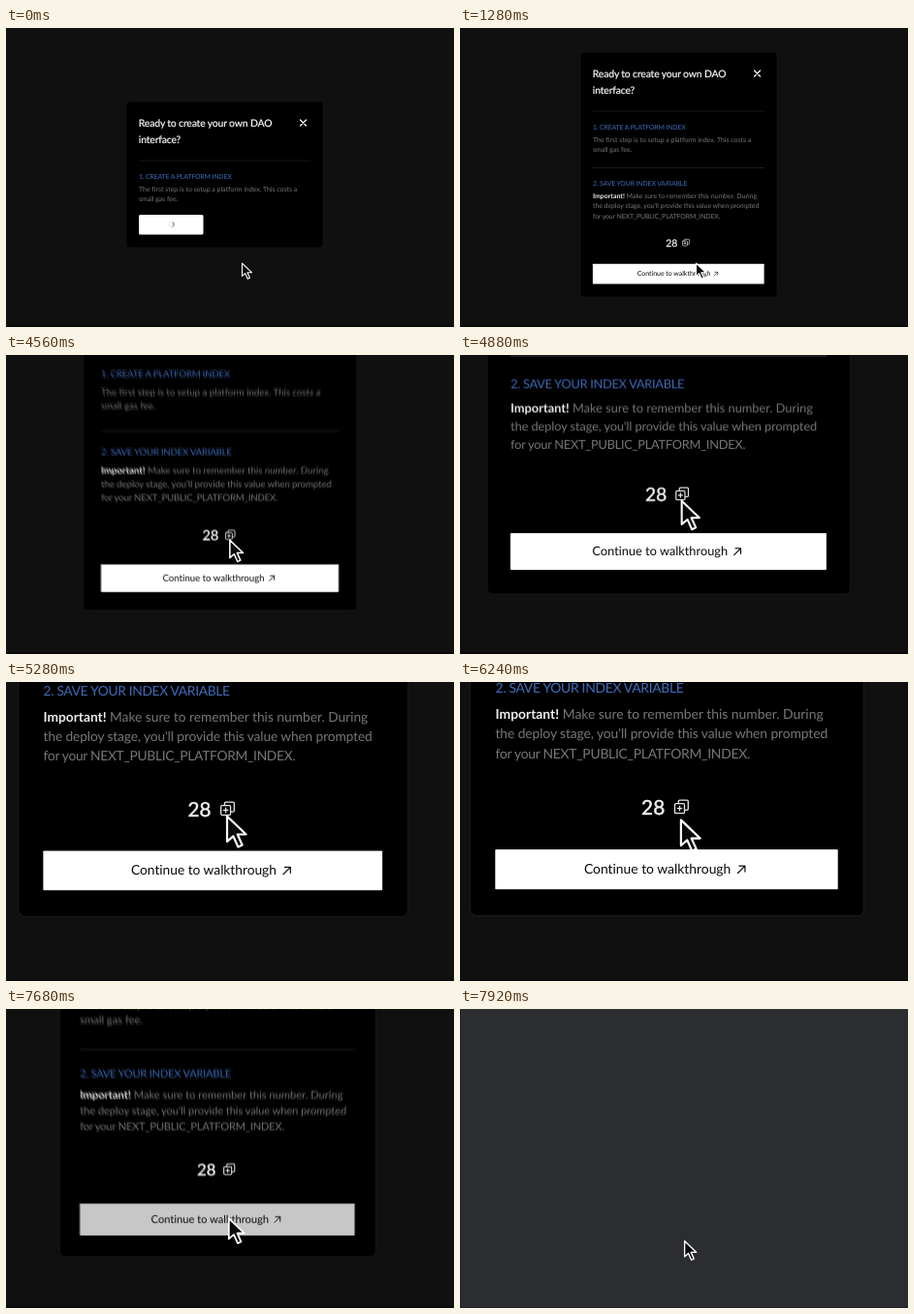
Animation, 462 px wide and 309 px high, one loop 8 s. Source, as an HTML page:

```html
<!DOCTYPE html>
<html lang="en">
<head>
<meta charset="utf-8">
<title>Create dialog</title>
<style>
  html, body { margin: 0; width: 100%; height: 100%; overflow: hidden; background: #101010; }
  svg { display: block; width: 100%; height: 100%; }
  text {
    font: 6.95px Lato, "Open Sans", sans-serif; font-variant-ligatures: none;
    fill: #777; text-rendering: geometricPrecision; white-space: pre;
  }
  .title { font-size: 10.4px; font-weight: 500; letter-spacing: -.165px; fill: #f2f2f2; stroke: #f2f2f2; stroke-width: .18px; }
  .head { fill: #3f6cba; letter-spacing: -.15px; }
  .strong { font-weight: 700; fill: #eee; }
  .tight { letter-spacing: -.055px; }
  .code { letter-spacing: -.13px; }
  .count { font-size: 10.4px; fill: #f2f2f2; stroke: #f2f2f2; stroke-width: .25px; }
  .label { fill: #0a0a0a; }
  .line { fill: none; stroke-linecap: round; stroke-linejoin: round; }
</style>
</head>
<body>
<svg viewBox="0 0 462 309" preserveAspectRatio="none">
  <defs>
    <g id="dialog">
      <rect id="panel" x="124" y="25" width="203" height="253" rx="3" fill="#000" stroke="#191919" stroke-width=".6"/>
      <text class="title" x="136.8" y="51">Ready to create your own DAO</text>
      <text class="title" x="136.8" y="68.3">interface?</text>
      <path class="line" d="M303.5 44l6 6m0-6l-6 6" stroke="#fff" stroke-width="1.2"/>
      <path d="M137 86H314" stroke="#202020" stroke-width=".7"/>
      <text class="head" x="137" y="104.6">1. CREATE A PLATFORM INDEX</text>
      <text x="137" y="117.8">The first step is to setup a platform index. This costs a</text>
      <text x="137" y="128">small gas fee.</text>

      <g id="loading">
        <rect x="137" y="142" width="66.5" height="20.6" rx="1.5" fill="#fff"/>
        <circle class="line" cx="170.5" cy="152.2" r="2.7" stroke="#e2e2e2" stroke-width=".8"/>
        <path id="spinner" class="line" d="M171.9 149.9A2.7 2.7 0 0 1 171.9 154.5" stroke="#444" stroke-width=".8"/>
      </g>

      <g id="ready">
        <path d="M137 144.5H314" stroke="#2a2a2a" stroke-width=".7"/>
        <text class="head" x="137" y="162.6">2. SAVE YOUR INDEX VARIABLE</text>
        <text x="137" y="176.2"><tspan class="strong">Important!</tspan> Make sure to remember this number. During</text>
        <text class="tight" x="137" y="186.4">the deploy stage, you'll provide this value when prompted</text>
        <text class="code" x="137" y="196.6">for your NEXT_PUBLIC_PLATFORM_INDEX.</text>
        <text class="count" x="212.3" y="225.7">28</text>
        <g class="line" stroke="#e8e8e8" stroke-width=".65">
          <rect x="229.5" y="220.1" width="5" height="5" rx=".6"/>
          <path d="M231.4 220V218.9Q231.4 218.3 232 218.3H235.8Q236.4 218.3 236.4 218.9V222.8Q236.4 223.4 235.8 223.4H234.6M232 221.4V223.7M230.85 222.55H233.15"/>
        </g>
        <rect id="button" x="136.9" y="243.8" width="176.7" height="20.6" rx=".4"/>
        <text class="label" x="182.7" y="256.3">Continue to walkthrough</text>
        <path class="line" d="M262 256L265.7 252.3M262.7 252.3H265.7V255.3" stroke="#0a0a0a" stroke-width=".6"/>
      </g>
    </g>
  </defs>

  <rect width="462" height="309" fill="#101010"/>
  <g id="scene"></g>
  <rect y="307.5" width="462" height="1.5" fill="#060606"/>
  <g id="next">
    <rect width="462" height="309" fill="#1b2130"/>
    <rect x="1" width="461" height="308" fill="#2b2d30"/>
  </g>
  <path id="cursor" d="M.5 .9V14.1L3.7 11.3L6.2 16.9L8.4 15.9L5.9 10.4H10.4Z" fill="#0a0a0a" stroke="#fff" stroke-width="1.1" stroke-linejoin="round"/>
</svg>
<script>
const LOOP = 8000;
const READY_AT = 560, ZOOM_IN = 4345, ZOOM_OUT = 7461, PAGE_AT = 7840;
const FOCUS = { x: 237.5, y: 314.5 };
const SHUTTER = 8, SAMPLES = 5;
const CURSOR = [
  [0, 243, 242.3], [2900, 243, 242.3], [3700, 232.2, 224.8],
  [6200, 232.2, 224.8], [6420, 232.2, 256], [6640, 232.2, 252.5], [LOOP, 232.2, 252.5]
];

const $ = id => document.getElementById(id);
const set = (el, name, value) => el.setAttribute(name, value);
const show = (el, on) => set(el, 'visibility', on ? 'visible' : 'hidden');
const clamp = v => Math.min(1, Math.max(0, v));
const smooth = u => u * u * (3 - 2 * u);
const mix = (a, b, u) => a + (b - a) * u;

// Critically damped spring from 0 to 1
function spring(ms) {
  const x = Math.max(0, ms) * 0.0062;
  return 1 - (1 + x) * Math.exp(-x);
}

const zoom = t => 1 + spring(t - ZOOM_IN) - spring(t - ZOOM_OUT);
const zoomed = s => `translate(${FOCUS.x * (1 - s)} ${FOCUS.y * (1 - s)}) scale(${s})`;

function cursorAt(t) {
  const i = CURSOR.findIndex(k => k[0] > t);
  const [t0, x0, y0] = CURSOR[i - 1], [t1, x1, y1] = CURSOR[i];
  const u = smooth((t - t0) / (t1 - t0));
  return [mix(x0, x1, u), mix(y0, y1, u)];
}

// Stacked copies average into motion blur while zooming
const copies = Array.from({ length: SAMPLES }, (_, i) => {
  const use = document.createElementNS('http://www.w3.org/2000/svg', 'use');
  set(use, 'href', '#dialog');
  set(use, 'opacity', 1 / (i + 1));
  $('scene').append(use);
  return use;
});

function draw(t) {
  const ready = t >= READY_AT;
  set($('panel'), 'height', ready ? 253 : 151);
  show($('loading'), !ready);
  show($('ready'), ready);
  set($('spinner'), 'transform', `rotate(${t * 0.36} 170.5 152.2)`);

  const shade = Math.round(mix(255, 199, clamp((t - 6320) / 200)));
  set($('button'), 'fill', `rgb(${shade},${shade},${shade})`);

  const s = zoom(t);
  const moving = Math.abs(zoom(t + SHUTTER) - s) > 0.0005;
  const drop = ready ? '' : ' translate(0 51)';
  copies.forEach((use, i) => {
    const shift = SHUTTER * (i / (SAMPLES - 1) - 0.5);
    set(use, 'display', i && !moving ? 'none' : 'inline');
    set(use, 'transform', zoomed(moving ? zoom(t + shift) : s) + drop);
  });

  show($('next'), t >= PAGE_AT);
  const [x, y] = cursorAt(t);
  set($('cursor'), 'transform', `${zoomed(s)} translate(${x} ${y})`);
}

const start = performance.now();
function tick() {
  draw((performance.now() - start) % LOOP);
  requestAnimationFrame(tick);
}
tick();
</script>
</body>
</html>
```
